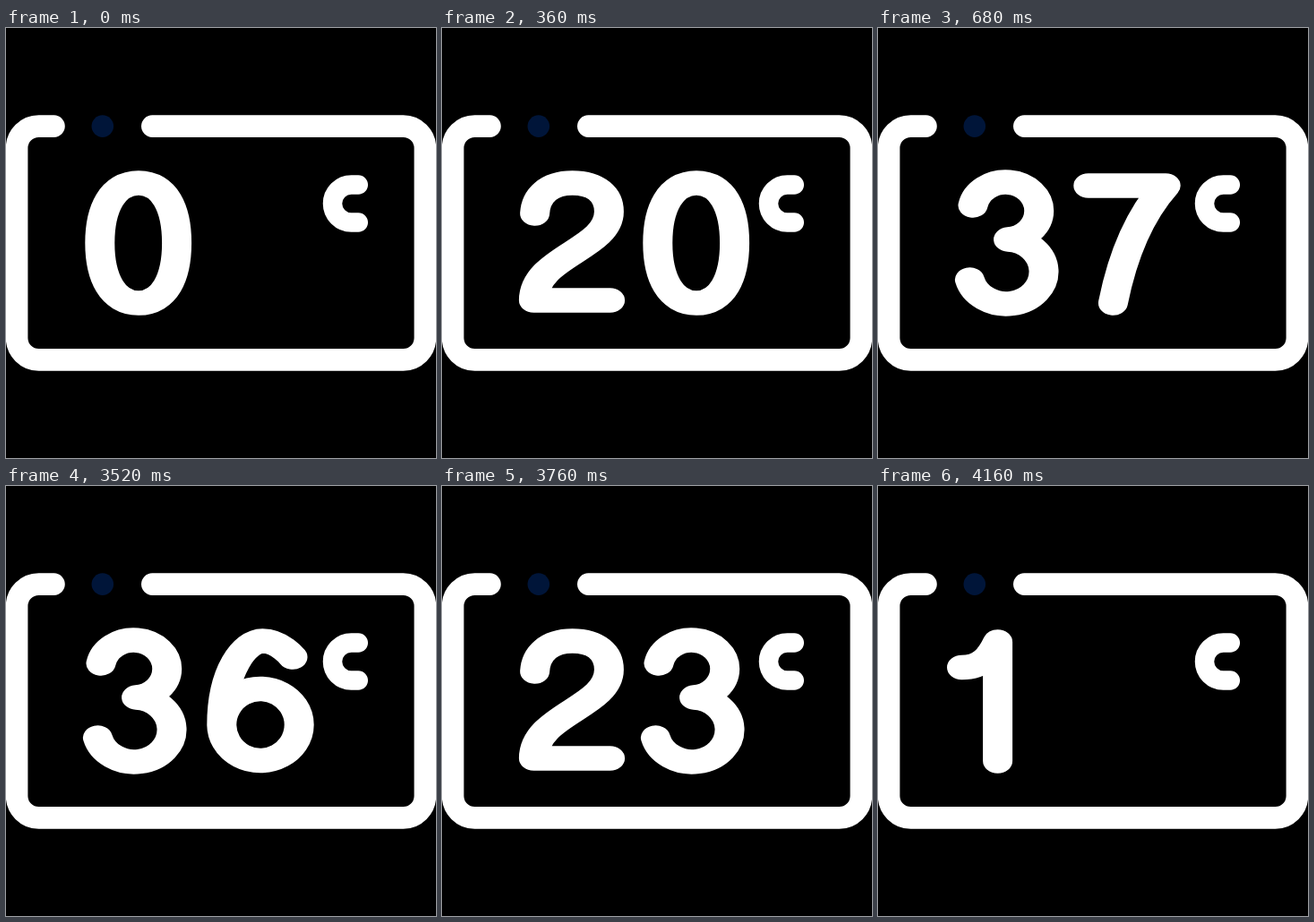
An HTML page that plays this animation: 480 px wide and 480 px high, repeating every 4.2 s.

```html
<!DOCTYPE html>
<html lang="en">
<head>
<meta charset="utf-8">
<title>Temperature display</title>
<style>
  html, body { margin: 0; width: 100%; height: 100%; overflow: hidden; background: #000; }
  svg { display: block; width: 100vw; height: 100vh; }
  path { fill: none; stroke: #fff; stroke-linecap: round; stroke-linejoin: round; }
</style>
</head>
<body>
<svg viewBox="0 0 480 480">
  <path stroke-width="24.6" d="M53.5 109.6H36.5A24.4 24.4 0 0 0 12.1 134V346A24.4 24.4 0 0 0 36.5 370.4H443.5A24.4 24.4 0 0 0 467.9 346V134A24.4 24.4 0 0 0 443.5 109.6H163.3"/>
  <circle cx="107.8" cy="109.6" r="12.3" fill="#001539"/>
  <path stroke-width="21.5" d="M393.3 175H385.5a21 21 0 0 0 0 42H393.3"/>
  <g id="digits" stroke-width="27.5"><path/><path/></g>
</svg>
<script>
const LOOP = 4200, STEP = 40, TOP = 37, RAMP = 680;

// Centre lines of the digits; drawn wider than high, so upright strokes are heavier
const six = "M90 32S78 14 62 14S24 46 24 108A36 40 0 1 0 24 107";
const glyphs = [
  "M24 81C24 42 36 14 60 14S95.5 42 95.5 81S84 148 60 148S24 120 24 81Z",
  "M48 148V15C42 30 34 43.5 14.6 43.5",
  "M23 48C24 28 36 14 58 14S92 27 92 46C92 88 22 96 22 145H93",
  "M25 39A31 32 0 1 1 58 77A35 36 0 1 1 22 122",
  "M76 148V14L17 113H93",
  "M86 17H36L28 77A37.5 42 0 1 1 22 124",
  six,
  "M19 17H91Q56 64 42 148",
  "M59 77A30 31.5 0 1 1 60 77A36 35.5 0 1 1 59 77Z",
  six
];
const slots = document.querySelectorAll("#digits path");

function setDigit(slot, digit, x) {
  const turn = digit === "9" ? " rotate(180 60 81)" : "";
  slot.setAttribute("d", digit ? glyphs[digit] : "");
  slot.setAttribute("transform", `translate(${x} 159) scale(1.2 1)${turn}`);
}

function draw(now) {
  const t = Math.floor(now % LOOP / STEP) * STEP;
  const rise = TOP * (t + 6) / RAMP;
  const fall = TOP * (4180 - t) / RAMP;
  const [first, second] = String(Math.round(Math.min(TOP, rise, fall)));
  setDigit(slots[0], first, 76);
  setDigit(slots[1], second, first === "1" ? 171.5 : 212);
}

let start;
function tick(now) {
  start ??= now;
  draw(now - start);
  requestAnimationFrame(tick);
}
draw(0);
requestAnimationFrame(tick);
</script>
</body>
</html>
```
